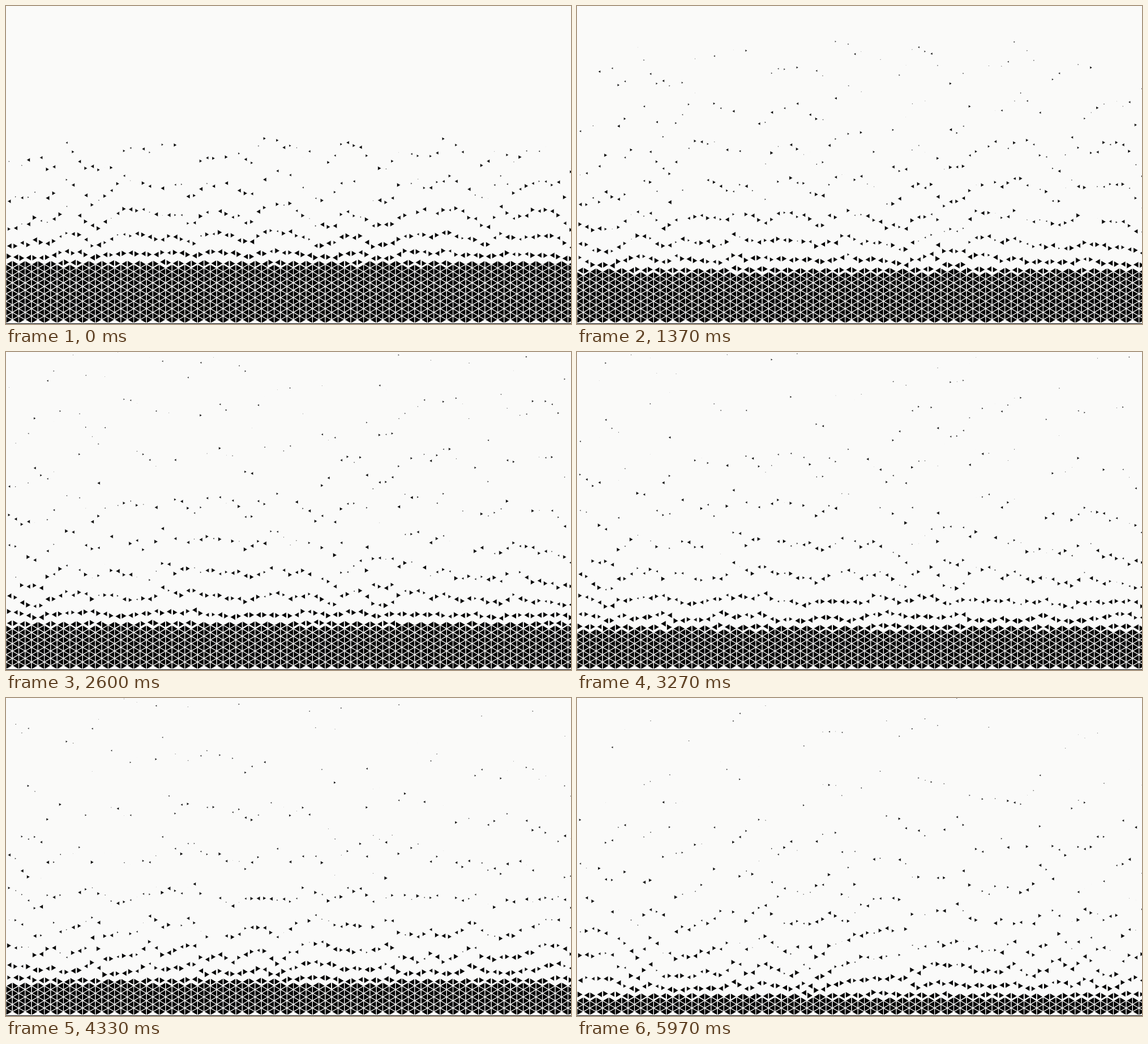
Animation of 998 by 561 pixels, one loop 6.01 s. Source, as an HTML page with a canvas:

```html
<!DOCTYPE html>
<html lang="en">
<head>
<meta charset="utf-8">
<title>Dissolving triangles</title>
<style>
html, body { margin: 0; width: 100%; height: 100%; overflow: hidden; background: #fafaf9; }
canvas { display: block; }
</style>
</head>
<body>
<canvas id="stage" width="998" height="561"></canvas>
<script>
const WIDTH = 998, HEIGHT = 561;
const ctx = document.getElementById('stage').getContext('2d');
const PAPER = '#fafaf9', INK = '#000';
const LOOP = 6010, STEP = 100 / 3;
const COL = 11.28, HALF = COL / Math.sqrt(3); // column width, half a triangle's side
const COLS = 89, FIRST = -6, LAST = 14;
const BOTTOM = 560;
const LIFT = 5.7; // rise in px per squared unit of age
const GAP = 1.2;

const mix = (a, b, k) => a + (b - a) * k;
const smooth = k => k * k * (3 - 2 * k);

function random(x, y, seed) {
  const v = Math.sin(x * 12.9898 + y * 78.233 + seed * 37.719) * 43758.5453;
  return v - Math.floor(v);
}

// Smooth noise from -1 to 1
function noise(x, y) {
  const i = Math.floor(x), j = Math.floor(y);
  const u = smooth(x - i), v = smooth(y - j);
  const top = mix(random(i, j, 3), random(i + 1, j, 3), u);
  const low = mix(random(i, j + 1, 3), random(i + 1, j + 1, 3), u);
  return mix(top, low, v) * 2 - 1;
}

// Rows released after t seconds: a steady pace that quickens late on
const released = t => -0.73 + 1.6 * t + 0.8 * Math.max(0, t - 3.8);

// Neighbours lag together, and lower rows scatter more
function delay(c, n) {
  const spread = mix(0.55, 0.85, (n - FIRST) / (LAST - FIRST));
  return spread * noise(c / 2.2, n / 4) + 0.25 * (random(c, n, 1) - 0.5);
}

const cells = [];
for (let n = FIRST; n <= LAST; n++) {
  for (let c = 0; c < COLS; c++) {
    cells.push({
      x: (c + 0.5) * COL,
      y: BOTTOM - (LAST - n + 1) * HALF,
      dir: (c + n) % 2 ? -1 : 1,
      start: n + delay(c, n),
      life: 3 + 8.5 * random(c, n, 2)
    });
  }
}

function triangle(x, y, dir, size) {
  const w = dir * size * COL / 2, h = size * HALF;
  ctx.lineWidth = GAP * size;
  ctx.beginPath();
  ctx.moveTo(x - w, y - h);
  ctx.lineTo(x + w, y);
  ctx.lineTo(x - w, y + h);
  ctx.closePath();
  ctx.fill();
  ctx.stroke();
}

function draw(t) {
  ctx.fillStyle = ctx.strokeStyle = PAPER;
  ctx.fillRect(0, 0, WIDTH, HEIGHT);
  ctx.fillStyle = INK;
  const rows = released(t / 1000);
  for (const { x, y, dir, start, life } of cells) {
    const age = Math.max(0, rows - start);
    const size = 1 - age / life;
    if (size > 0) triangle(x, y - LIFT * age * age, dir, size);
  }
  ctx.fillRect(0, BOTTOM, WIDTH, 1);
}

function tick() {
  const t = performance.now() % LOOP;
  draw(Math.round(t / STEP) * STEP);
  requestAnimationFrame(tick);
}
tick();
</script>
</body>
</html>
```
